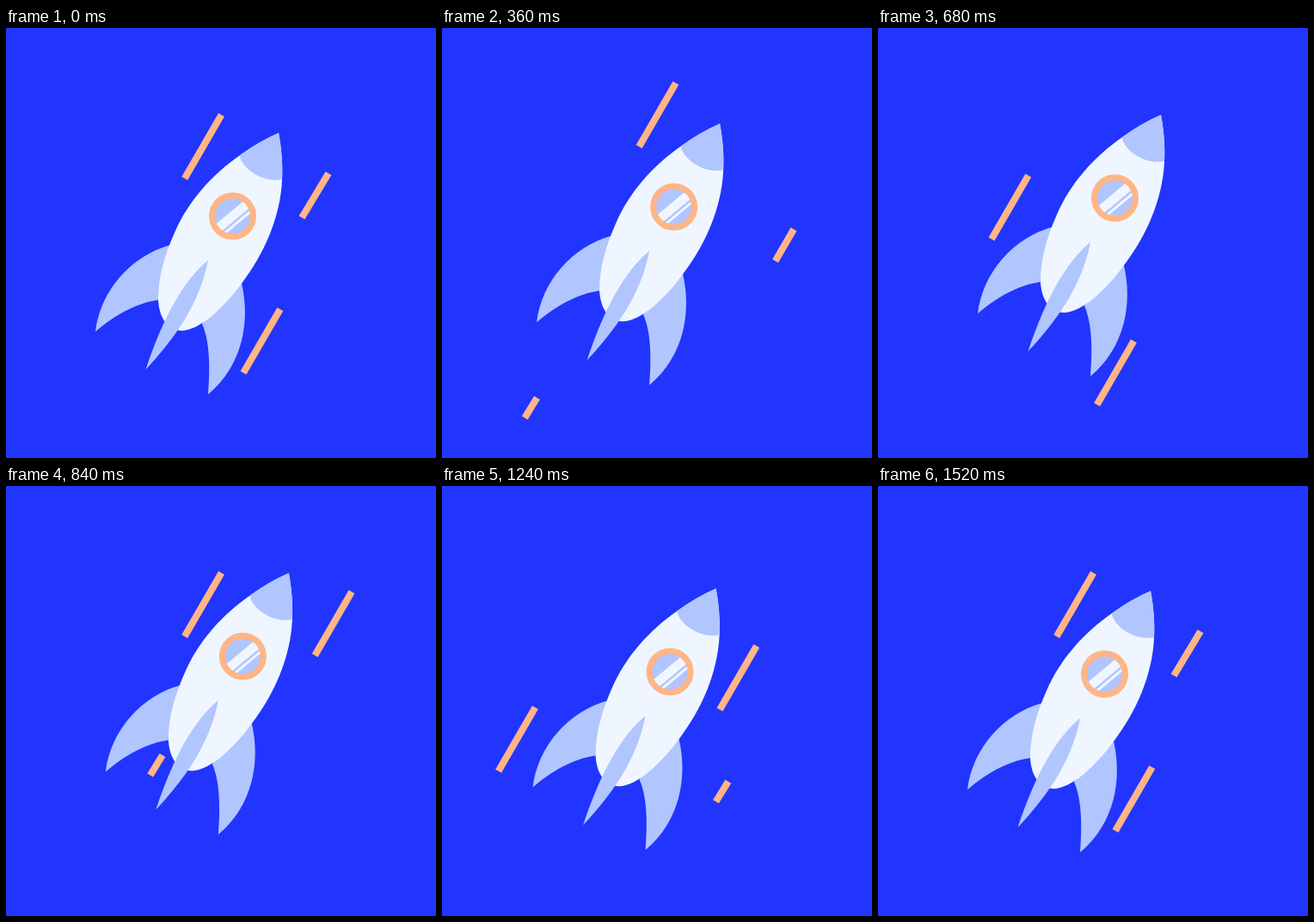
Animation, 500 px wide and 500 px high, one loop 1560 ms. Source, as an HTML page:

```html
<!DOCTYPE html>
<html lang="en">
<head>
<meta charset="utf-8">
<title>Rocket</title>
<style>
  html, body { margin: 0; width: 100%; height: 100%; overflow: hidden; background: #2135ff; }
  svg { display: block; width: 100vw; height: 100vh; }
  .white { fill: #eff6ff; }
  .pale { fill: #b1c5ff; }
  .streaks { stroke: #ffb585; stroke-width: 8; }
  .shine { stroke: #eff6ff; }
</style>
</head>
<body>
<svg viewBox="0 0 500 500">
  <defs>
    <clipPath id="glass"><circle cx="263.5" cy="218.7" r="21"/></clipPath>
  </defs>
  <g class="streaks" id="streaks"></g>
  <g id="rocket">
    <path class="pale" d="M104 353C110 305 145 265 192 252L200 310L178 316C150 320 125 335 104 353Z"/>
    <path class="pale" d="M274 297C284 340 276 392 235 426C238 390 236 362 228 344L240 310Z"/>
    <path class="white" d="M317 122Q294 132 272 148C240 170 212 201 196 238C184 265 177 290 177 316C178 337 188 352 205 352C225 351 252 327 274 297C300 263 319 220 321 177C322 157 320 138 317 122Z"/>
    <path class="pale" d="M317 122Q294 132 272 148C272 160 296 181 321 176C322 157 320 138 317 122Z"/>
    <path class="pale" d="M235 270C207 293 183 335 162.5 397C195 362 225 322 235 270Z"/>
    <circle class="pale" cx="263.5" cy="218.7" r="24"/>
    <g class="shine" clip-path="url(#glass)">
      <path stroke-width="10.5" d="M238.5 239.6L288.5 197.8"/>
      <path stroke-width="3" d="M244.5 246.6L294.5 204.8"/>
    </g>
    <circle cx="263.5" cy="218.7" r="24" fill="none" stroke="#ffb585" stroke-width="7"/>
  </g>
</svg>
<script>
  const STEP = 40, LOOP = 1560, CYCLE = 38;
  const UNITS = 6; // each streak crosses six half-lengths

  const long = [-21.4, 37], medium = [-15.5, 25.75], short = [-14.3, 23.4];

  // x, y, half-length vector, steps at which the streak sets off
  const tracks = [
    [293.3, 27, long, [7, 18, 35]],
    [383, 216, long, [12, 34]],
    [409, 234, long, [9]],
    [239, 60.5, long, [13]],
    [423.4, 86, long, [19]],
    [194, 109.5, long, [26]],
    [430, 75, long, [27]],
    [437, 66, medium, [33]],
    [182, 313, short, [3, 10, 21]],
    [404.3, 226.6, short, [25]]
  ];

  const rocket = document.getElementById('rocket');
  const layer = document.getElementById('streaks');
  const lines = tracks.map(() =>
    layer.appendChild(document.createElementNS('http://www.w3.org/2000/svg', 'line')));

  const clamp = v => Math.min(1, Math.max(0, v));

  function ease(v) {
    v = clamp(v);
    return v < 0.5 ? 4 * v ** 3 : 1 - 4 * (1 - v) ** 3;
  }

  function drawStreak(line, [x, y, [dx, dy], starts], step) {
    const age = Math.min(...starts.map(s => (step - s + CYCLE) % CYCLE));
    const visible = age <= UNITS;
    line.setAttribute('visibility', visible ? 'visible' : 'hidden');
    if (!visible) return;
    const tail = Math.max(0, age - 1), head = Math.min(UNITS, age + 1);
    line.setAttribute('x1', x + dx * tail);
    line.setAttribute('y1', y + dy * tail);
    line.setAttribute('x2', x + dx * head);
    line.setAttribute('y2', y + dy * head);
  }

  function draw(ms) {
    const step = Math.floor((ms % LOOP) / STEP) % CYCLE;
    const t = step * STEP;
    const lift = ease((t + 22) / 760) - ease((t - 723) / 760);
    rocket.setAttribute('transform', `translate(${12 * lift} ${-21 * lift})`);
    lines.forEach((line, i) => drawStreak(line, tracks[i], step));
  }

  const begin = performance.now();
  function tick() {
    draw(performance.now() - begin);
    requestAnimationFrame(tick);
  }
  tick();
</script>
</body>
</html>
```
